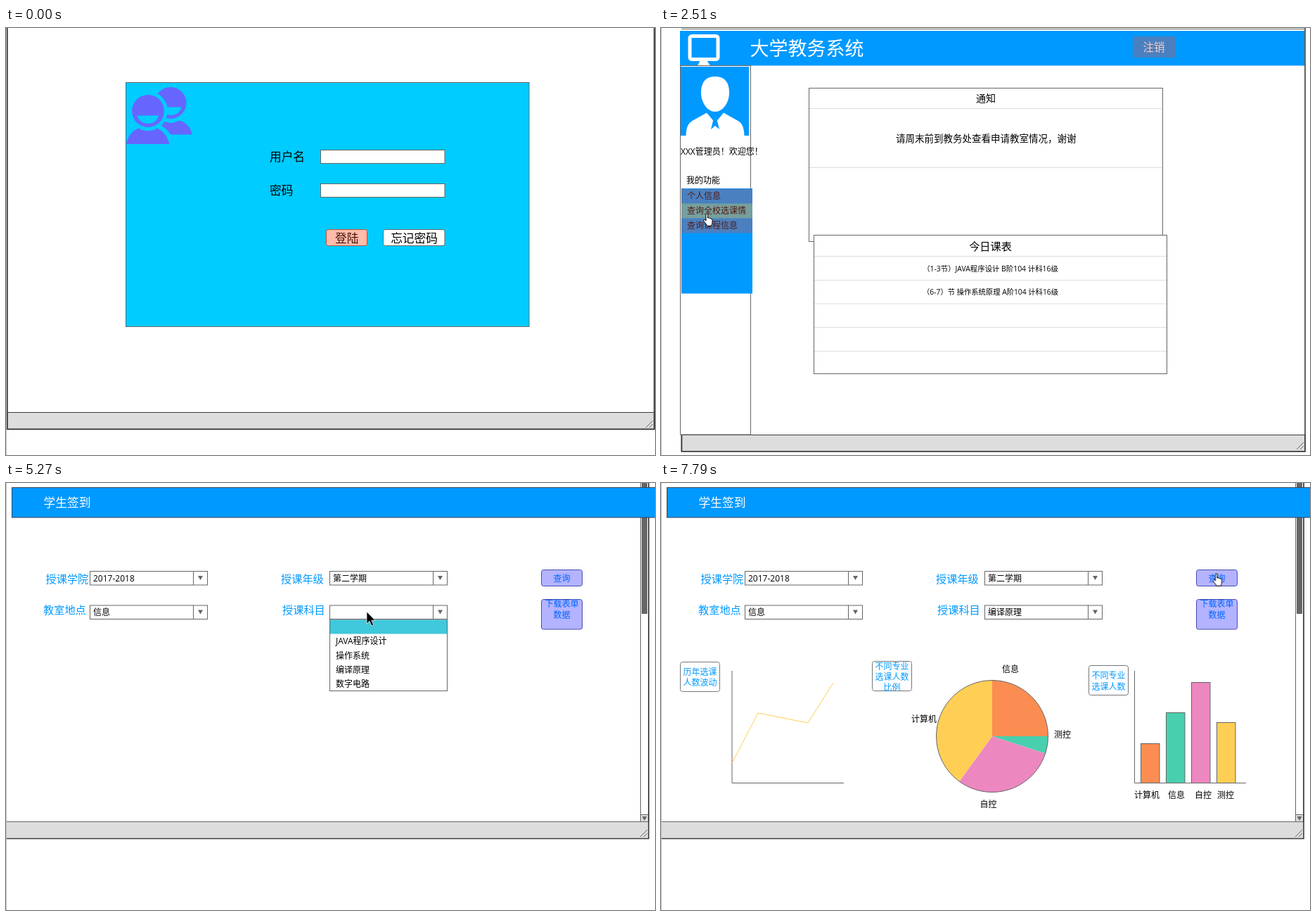
An HTML page that plays this animation: 923x607 px, repeating every 8 s.

```html
<!DOCTYPE html>
<html lang="zh-CN">
<head>
<meta charset="utf-8">
<title>大学教务系统</title>
<style>
html, body { margin: 0; width: 100%; height: 100%; overflow: hidden; background: #fff; }
svg { display: block; width: 923px; height: 607px;
  font-family: "Open Sans", "Noto Sans CJK SC", "Noto Sans CJK JP", "Noto Sans CJK", sans-serif; }
</style>
</head>
<body>
<svg id="stage" viewBox="0 0 923 607"></svg>
<script>
const LOOP = 8000;
const BLUE = '#0099ff', LINK = '#0066ff', GRAY = '#666', DARK = '#3c3c3c', ITEM = '#4b80c0';
const css = [];

// Text placed by the vertical middle of its line
const text = (x, y, s, size = 12, fill = '#000', anchor = 'start') =>
  `<text x="${x}" y="${(y + size * 0.37).toFixed(2)}" font-size="${size}" fill="${fill}" text-anchor="${anchor}">${s}</text>`;
const mid = (x, y, s, size, fill) => text(x, y, s, size, fill, 'middle');
const box = (x1, y1, x2, y2, fill, stroke = 'none', r = 0) =>
  `<rect x="${x1}" y="${y1}" width="${x2 - x1}" height="${y2 - y1}" rx="${r}" fill="${fill}" stroke="${stroke}"/>`;
const path = (d, fill, stroke = 'none', extra = '') =>
  `<path d="${d}" fill="${fill}" stroke="${stroke}" ${extra}/>`;
const line = (d, stroke = GRAY, width = 1, dash = '') =>
  path(d, 'none', stroke, `stroke-width="${width}" stroke-dasharray="${dash}"`);
const group = (id, body) => `<g id="${id}">${body}</g>`;
const grip = (x, y) => line(`M${x - 10} ${y}l10 -10M${x - 5} ${y}l5 -5`, GRAY);

// Stepped CSS animation from [ms, value] stops
function track(id, prop, stops, first) {
  const frames = [[0, first], ...stops]
    .map(([ms, v]) => `${ms / LOOP * 100}%{${prop}:${v}}`).join('');
  css.push(`@keyframes ${id}{${frames}}#${id}{animation:${id} ${LOOP}ms step-end infinite}`);
}
function show(id, from, to = LOOP) {
  const stops = [[from, 1]];
  if (to < LOOP) stops.push([to, 0]);
  track(id, 'opacity', stops, 0);
}
const move = (id, stops) => track(id, 'transform',
  stops.map(([ms, x, y]) => [ms, `translate(${x}px,${y}px)`]), 'translate(-99px,-99px)');

function login() {
  const purple = '#6666ff', cyan = '#00ccff';
  const icon = `
    <circle cx="234" cy="106.500" r="22.500" fill="${purple}"/>` +
    path('M222 112.500H249.500Q246 124 234 124Q226 123 222 112.500Z', cyan) +
    path('M218 137Q222 133 224 132Q235 138 246 131.500Q260 134 265 151.500H234Q229 143 218 137Z', purple) +
    `<circle cx="202" cy="118" r="28" fill="${cyan}"/>
    <circle cx="202" cy="118" r="23" fill="${purple}"/>` +
    path('M186 124.500H217.500Q213 136 202 136T186 124.500Z', cyan) +
    path('M171 165Q175 147 189 142.500Q202 150 215 142.500Q228 148 232.500 165Z', purple);
  return box(1.8, -5, 922, 570.3, '#fff', DARK) +
    box(2, 546.5, 921.5, 570, '#ddd', DARK) + grip(920, 568) +
    line('M1.800 0V570.500H922V0', DARK, 1.6) +
    box(170.5, 77.5, 744, 424.5, cyan, GRAY) + icon +
    text(375, 183, '用户名', 16.7) + text(375, 231, '密码', 16.7) +
    box(447.5, 173.5, 624, 192.5, '#fff', GRAY) + box(447.5, 221.5, 624, 240.5, '#fff', GRAY) +
    box(455.5, 286.5, 513.5, 309.5, '#ffbbab', '#b5523f', 3) + mid(484.7, 299, '登陆', 16.7, '#4a1408') +
    box(536.5, 286.5, 624, 309.5, '#fff', GRAY, 3) + mid(580.5, 299, '忘记密码', 16.7);
}

function profile() {
  const cols = [188.5, 337, 488, 639];
  const rows = [
    ['姓名', '顾砚禾', '性别', '男'],
    ['工号', '2012011101', '籍贯', '北京'],
    ['学院', '信息学院', '学历', '高中'],
    ['入学时间', '2016.1.1']
  ];
  const cells = rows.map((r, i) => r.map((s, j) => mid(cols[j], 128 + i * 50.2, s, 12, LINK)).join('')).join('');
  return box(1, 0, 923, 607, '#fff') + box(2, 0, 923, 500, '#ccc') +
    box(2, 500.5, 930, 524, '#ddd', DARK) + grip(925, 522) +
    line('M1.800 0V524H923', DARK, 1.6) +
    box(85, 18, 746, 448.5, '#fff') +
    text(132, 50, '工号：2012011101', 15.2, LINK) + text(472.5, 50, '姓名：顾砚禾', 15.2, LINK) +
    line('M115 152.500H715M115 202.500H715M115 252.500H715M115 303H715', '#c4c4c4') +
    line('M262.500 101V353M412.500 101V353M563.500 101V353', '#c4c4c4') +
    line('M115 100H720M123 353.500H716', '#777', 1, '1 1') + cells;
}

function home() {
  const menu = ['个人信息', '查询全校选课情况', '查询课程信息'];
  const items = menu.map((_, i) => box(29, 228.5 + i * 21, 130, 249.5 + i * 21, ITEM)).join('') +
    group('hover', box(29, 249.5, 130, 270.5, '#769f9d')) +
    `<svg x="0" y="0" width="122" height="607">` +
    menu.map((s, i) => text(37, 239 + i * 21, s, 12, '#561a12')).join('') + '</svg>';
  const avatar = box(28, 55, 125, 153, BLUE) +
    path('M77 69C92 69 97 79 97 92C97 106 88 119 77 119S57 106 57 92C57 79 62 69 77 69Z', '#fff') +
    path('M35.500 153C36 138 40 134 48 130L65 120.500L77 135L89 120.500L106 130C114 134 118 138 118.500 153Z', '#fff') +
    path('M72 124H82L79.500 130L83 144L77 139L71 144L74.500 130Z', BLUE);
  const monitor = box(41, 11.5, 81, 44.5, 'none', '#fff', 3).replace('/>', ' stroke-width="5"/>') +
    path('M56 46H65L70 53.500H52Z', '#fff');
  return box(1, 0, 923, 607, '#fff') +
    box(29, 578.5, 916, 602, '#ddd', DARK) + grip(914, 599) +
    line('M29.500 578V602H916V0', DARK, 1.6) + line('M29 1.500H916', GRAY) +
    box(27, 4, 915, 53.5, BLUE) + monitor +
    text(126.5, 29, '大学教务系统', 27, '#fff') +
    box(671, 12, 732, 42, ITEM) + mid(701, 27.5, '注销', 15.5, '#ffc9bb') +
    box(27.5, 53.5, 127.5, 578, '#fff', GRAY) + avatar +
    text(28, 176, 'XXX管理员！欢迎您！') + text(36, 216.5, '我的功能') +
    box(29, 228, 130, 377.5, BLUE) + items +
    box(210.5, 85.5, 713.5, 303.5, '#fff', GRAY) +
    line('M211 114.500H713M211 198.500H713', '#bbb', 1, '1 1') +
    mid(462, 100, '通知', 14) + text(334, 156.5, '请周末前到教务处查看申请教室情况，谢谢', 13.5) +
    box(217.5, 294.5, 719.5, 491.5, '#fff', GRAY) +
    line('M218 324.500H719M218 358.500H719M218 392H719M218 425.500H719M218 459.500H719', '#bbb', 1, '1 1') +
    mid(468.5, 310, '今日课表', 15.2) +
    mid(468.5, 342, '（1-3节）JAVA程序设计 B阶104 计科16级', 10.4) +
    mid(468.5, 375.5, '（6-7）节 操作系统原理 A阶104 计科16级', 10.3);
}

function combo(id, x, y, value, at) {
  show(id, at);
  return box(x + .5, y + .5, x + 167.5, y + 20, '#fff', GRAY) +
    line(`M${x + 147.5} ${y}v20`) + path(`M${x + 154} ${y + 7}h7l-3.500 6z`, GRAY) +
    group(id, text(x + 5, y + 10.5, value));
}

function list(id, x, y, items, from, to, rows) {
  const pitch = 20.2;
  show(id, from, to);
  track(id + 'Row', 'transform', rows.map(([ms, n]) => [ms, `translateY(${n * pitch}px)`]), 'none');
  return group(id, box(x + .5, y + .5, x + 167.5, y + 1 + pitch * (items.length + 1), '#fff', GRAY) +
    group(id + 'Row', box(x + 1, y + 1, x + 167, y + 21, '#40c8dc')) +
    items.map((s, i) => text(x + 9, y + 11.2 + pitch * (i + 1), s)).join(''));
}

function charts() {
  const fills = ['#fc8d52', '#48cfae', '#ed87c0', '#ffce55'];
  const cx = 471, cy = 360, r = 79.5;
  const at = share => {
    const a = share * 2 * Math.PI;
    return `${(cx + r * Math.sin(a)).toFixed(1)} ${(cy - r * Math.cos(a)).toFixed(1)}`;
  };
  const cuts = [0, .25, .3, .6, 1];
  const pie = fills.map((f, i) =>
    path(`M${cx} ${cy}L${at(cuts[i])}A${r} ${r} 0 0 1 ${at(cuts[i + 1])}Z`, f)).join('') +
    `<circle cx="${cx}" cy="${cy}" r="${r}" fill="none" stroke="${GRAY}"/>`;
  const bars = [370.5, 326.5, 283.5, 340.5].map((y, i) =>
    box(682.5 + i * 36, y, 709 + i * 36, 426.5, fills[i], GRAY)).join('');
  const tag = (x, y, lines, first) => box(x, y, x + 56, y + 42, '#fff', '#777', 3) +
    `<svg x="${x}" y="${y}" width="56" height="42.500">` +
    lines.map((s, i) => mid(28, first + i * 15.2, s, 12, BLUE)).join('') + '</svg>';
  return tag(27.5, 254.5, ['历年选课', '人数波动'], 14) +
    line('M101 267V426.500H260') + line('M101 398L138 327L209 341L245 284', fills[3]) +
    tag(300.5, 253.5, ['不同专业', '选课人数', '比例'], 7) + pie +
    mid(497, 264.5, '信息') + mid(571, 358, '测控') + mid(465.5, 456.5, '自控') + mid(374, 336, '计算机') +
    tag(608.5, 259.5, ['不同专业', '选课人数'], 14.5) +
    line('M673.500 267V426.500H832') + bars +
    mid(691, 444, '计算机') + mid(733, 444, '信息') + mid(771, 444, '自控') + mid(803, 444, '测控');
}

function report() {
  const label = (x, y, s) => text(x, y, s, 15.2, BLUE);
  const button = (y1, y2) => box(761.5, y1, 819.5, y2, '#b3b3ff', '#4a4ab4', 3);
  return box(1, 0, 923, 607, '#fff') +
    box(902.5, -1, 914, 481.5, '#fff', GRAY) + box(904, 0, 912, 186, GRAY) +
    box(902.5, 471.5, 913.5, 481.5, '#ddd', GRAY) + path('M904.500 474h7l-3.500 6z', GRAY) +
    box(1, 481.5, 914, 505, '#ddd') + line('M1 481.500H914', GRAY) + grip(912, 503) +
    line('M1 505.500H914V0', DARK, 1.6) +
    box(8.5, 6.5, 930, 49, BLUE, '#345') + text(53.5, 28, '学生签到', 16.8, '#fff') +
    label(56.5, 136, '授课学院') + label(391, 136, '授课年级') +
    label(53, 180, '教室地点') + label(393, 180, '授课科目') +
    combo('year', 119, 125, '2017-2018', 3800) + combo('term', 460, 125, '第二学期', 5120) +
    combo('place', 119, 173.5, '信息', 4370) + combo('course', 460, 173.5, '编译原理', 5780) +
    button(123.5, 146.5) + mid(790.5, 136, '查询', 12, LINK) +
    button(165.5, 208) + mid(790.5, 172, '下载表单', 12, LINK) + mid(790.5, 187.5, '数据', 12, LINK) +
    group('charts', charts()) +
    list('years', 119, 145, ['2016-2017', '2017-2018', '2018-2019', '2019-2020'], 3290, 3800, [[3560, 1], [3680, 2]]) +
    list('places', 119, 193.5, ['计算机', '信息', '自控'], 3950, 4370, [[4220, 2]]) +
    list('terms', 460, 145, ['第一学期', '第二学期', '第三学期'], 4760, 5120, [[5000, 2]]) +
    list('courses', 460, 193.5, ['JAVA程序设计', '操作系统', '编译原理', '数字电路'], 5270, 5780,
      [[5390, 1], [5510, 2], [5630, 3]]);
}

const arrow = path('M0 0V17L4 13.300L7 20L9.700 18.800L6.800 12.300H12Z', '#000', '#fff', 'stroke-width=".7"');
const hand = path('M4 10V2.200Q4 .7 5.300 .7T6.600 2.200V7Q9 6.300 9.200 7.600Q11 7 11.200 8.400Q13 8 13 9.800V13' +
  'Q13 15.500 11.500 18.300H5.500Q4.500 15.500 1 12Q0 10.300 1.300 9.700Q2.800 9.300 4 11Z', '#fff', '#000');

document.getElementById('stage').innerHTML =
  group('login', login()) + group('profile', profile()) + group('home', home()) + group('report', report()) +
  line('M.5 0V607', '#bfbfbf') + group('arrow', arrow) + group('hand', hand);

track('login', 'opacity', [[1570, 0]], 1);
show('profile', 1570, 1820);
show('home', 1820, 2630);
show('hover', 2510, 2630);
show('report', 2630);
track('charts', 'opacity', [[6560, .4], [6710, .85], [6830, 1]], 0);

const off = ms => [ms, -99, -99];
move('arrow', [
  [400, 660, 541], [520, 706, 557], [640, 752, 573], off(760),
  [1970, 165, 331], off(2090),
  [2780, 620, 252], [2900, 400, 185], [3020, 168, 136], [3140, 190, 144],
  [3410, 208, 156], [3560, 230, 178], [3680, 247, 199], [3950, 246, 189],
  [4070, 240, 208], [4220, 235, 241], [4370, 290, 215], [4490, 400, 175], [4610, 510, 137],
  [4880, 511, 158], [5000, 513, 190], [5120, 513, 183],
  [5390, 516, 222], [5510, 518, 243], [5630, 520, 262],
  [5780, 548, 252], [5900, 630, 224], [6020, 707.5, 197],
  [6170, 735, 176], [6290, 758, 154], off(6410)
]);
move('hand', [
  [2090, 61, 288], [2240, 46, 275], [2360, 60, 263], off(2630),
  [6410, 781.5, 137], [6830, 782, 133], [6980, 785.5, 125.5],
  [7510, 785, 127], [7790, 784.5, 128]
]);

const style = document.createElement('style');
style.textContent = css.join('\n');
document.head.append(style);
</script>
</body>
</html>
```
